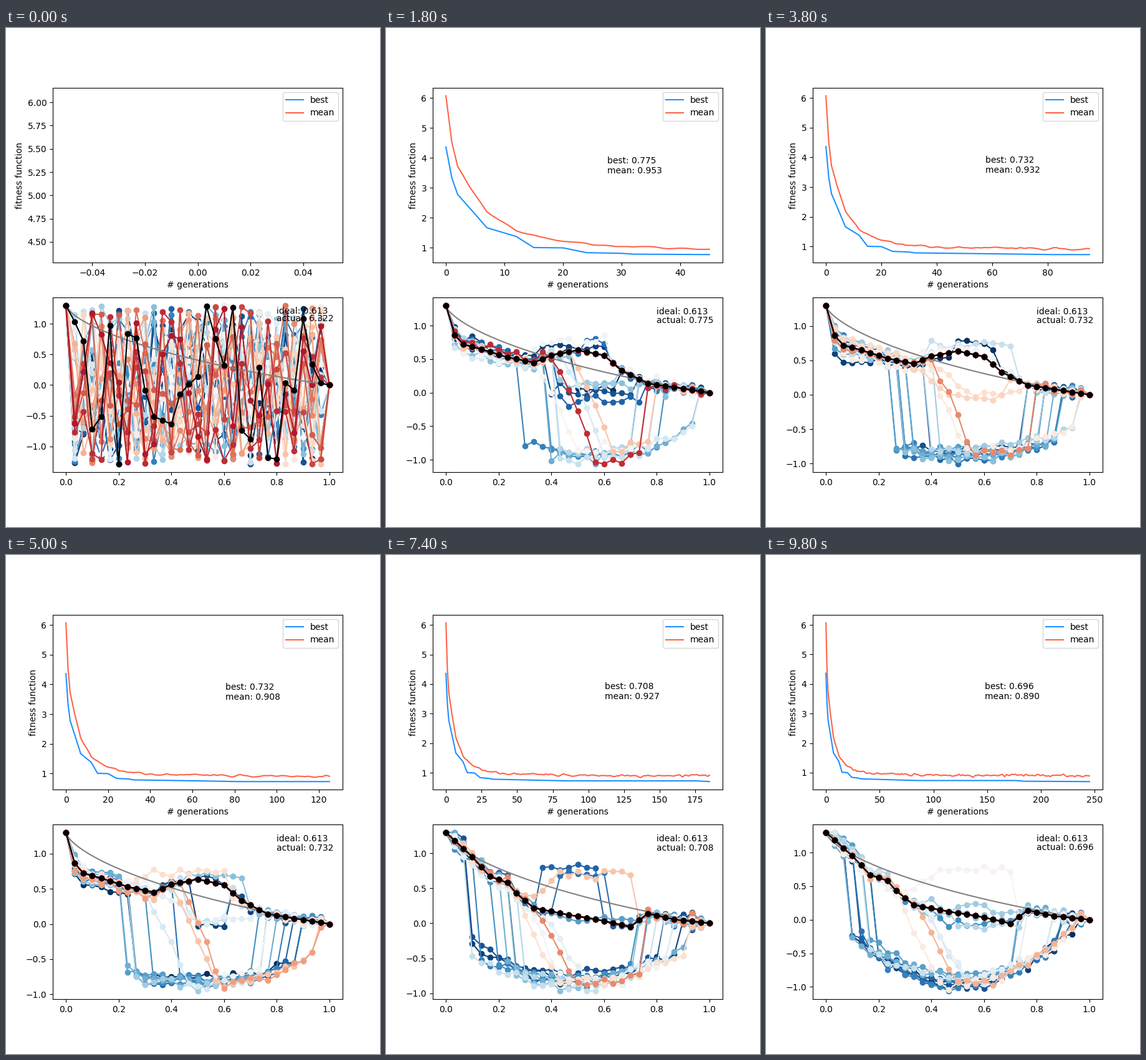
These frames come from a looping animation (600 px wide and 800 px high, 10000 ms). A matplotlib script:

```python
import numpy as np
import matplotlib.pyplot as plt
from matplotlib.animation import FuncAnimation

FRAMES, STEP = 50, 5          # one frame every five generations
N, POP = 31, 30               # points per curve, curves per population
TOP = 1.3
SWITCH = 36                   # frame at which the better route is found
J = np.arange(N)
X = J / (N - 1)
GENS = np.arange(FRAMES * STEP)
CMAP = plt.get_cmap("RdBu_r")


def through(x, knots):
    return np.interp(x, list(knots), list(knots.values()))


# ---- fitness history -------------------------------------------------
BEST = through(GENS, {0: 4.363, 1: 3.34, 2: 2.78, 5: 2.12, 7: 1.67, 12: 1.38,
                      15: 1.01, 20: 1, 24: .84, 30: .818, 32: .79, 65: .753,
                      82: .732, 176: .732, 185: .708, 245: .696})

mean_knots = {0: 6.07, 1: 4.53, 2: 3.72, 4: 3.05, 7: 2.2, 12: 1.57, 18: 1.285,
              25: 1.1, 30: 1.043, 40: .99, 65: .95, 125: .908, 150: .916,
              185: .927, 245: .89}
wobble = np.random.default_rng(4).normal(0, .03, GENS.size)
wobble = np.convolve(wobble, [.25, .5, .25], "same")
pins = list(mean_knots)
MEAN = through(GENS, mean_knots) + wobble - np.interp(GENS, pins, wobble[pins])

# ---- curves ----------------------------------------------------------
HUMP = through(J, {0: TOP, 1: .86, 2: .72, 4: .65, 7: .53, 10: .45, 12: .56,
                   15: .635, 18: .555, 20: .33, 23: .14, 30: 0})
STEEP = through(J, {0: TOP, 3: .95, 5: .67, 7: .58, 8: .43, 10: .22, 14: .12,
                    17: .06, 21: -.05, 23: .14, 26: .055, 30: 0})

theta = np.linspace(0, 2, 200)
fall_x, fall_y = theta - np.sin(theta), 1 - np.cos(theta)
IDEAL_X = fall_x / fall_x[-1]
IDEAL_Y = TOP * (1 - fall_y / fall_y[-1])


# ---- populations -----------------------------------------------------
def detour(rng, rank, best, low, first):
    """Leave the best curve between points a and b; rank runs from 0 to 1."""
    kind = rng.random()
    abrupt = rank < .45
    if kind < .66:
        a = first + rng.exponential(2.5) if abrupt else rng.uniform(13, 19)
        b = rng.integers(21, 29)
        path = low * rng.uniform(.9, 1.08)
    elif kind < .84:
        a, b = rng.uniform(10, 16), rng.integers(17, 22)
        path = rng.uniform(.5, .65) + .15 * np.sin(np.pi * X)
    else:
        a, b = rng.uniform(11, 16), rng.integers(18, 23)
        path = rng.uniform(-.1, .15)
    ramp = 1 if abrupt else 5
    w = np.clip((J - round(a)) / ramp + 1, 0, 1) * (J <= b)
    y = best * (1 - w) + path * w
    return y + rng.normal(0, .04, N) + rng.normal(0, .1) * np.exp(-J / 7)


def population(k):
    """Best curve and the remaining curves of frame k."""
    rng = np.random.default_rng(100 + k)
    best = HUMP if k < SWITCH else STEEP
    first = round(np.interp(k, [22, 37], [8, 3]))
    sharp = .35 + .75 * (k / FRAMES) ** 3
    low = -.82 * np.sin(np.pi * X).clip(0) ** sharp
    floor = -1 - .065 * np.cos(2 * np.pi * (k - 10) / 40)

    rest = np.tile(best, (POP - 1, 1))
    for i in range(POP - 1):
        rank = i / (POP - 2)
        if rng.random() > rank ** 2:    # high ranks are mostly copies
            rest[i] = detour(rng, rank, best, low, first)

    # the random beginning fades out
    w = np.exp(-.65 * k)
    noise = np.random.default_rng(7).uniform(-TOP, TOP, (POP, N))
    rest = rest * (1 - w) + noise[1:] * w
    best = best * (1 - w) + noise[0] * w
    floor = floor * (1 - w) - 1.29 * w

    curves = np.vstack([rest, best])
    curves[:, 0], curves[:, -1] = TOP, 0
    curves = np.where(curves < 0, curves * floor / curves.min(), curves)
    return np.minimum(curves, TOP)


# ---- drawing ---------------------------------------------------------
fig, (ax_fit, ax_path) = plt.subplots(2, 1, figsize=(6, 8), dpi=100)


def draw(k):
    g = k * STEP
    ax_fit.clear()
    ax_fit.plot(GENS[:g + 1], BEST[:g + 1], color="dodgerblue", label="best")
    ax_fit.plot(GENS[:g + 1], MEAN[:g + 1], color="tomato", label="mean")
    ax_fit.set_xlabel("# generations")
    ax_fit.set_ylabel("fitness function")
    ax_fit.legend(loc="upper right")
    if k:
        ax_fit.text(.6 * (g + 1), .8 * BEST[0],
                    f"best: {BEST[g]:.3f}\nmean: {MEAN[g]:.3f}")

    *rest, best = population(k)
    ax_path.clear()
    for i, y in enumerate(rest):
        ax_path.plot(X, y, "o-", color=CMAP(.9 * i / (POP - 2)))
    ax_path.plot(IDEAL_X, IDEAL_Y, color="gray")
    ax_path.plot(X, best, "o-", color="black")
    actual = BEST[g] if k else 6.322
    ax_path.text(.8, .9 * TOP, "ideal: 0.613")
    ax_path.text(.8, .8 * TOP, f"actual: {actual:.3f}")
    return []


anim = FuncAnimation(fig, draw, frames=FRAMES, interval=200, repeat=True,
                     repeat_delay=0, init_func=lambda: draw(0))
plt.show()
```
